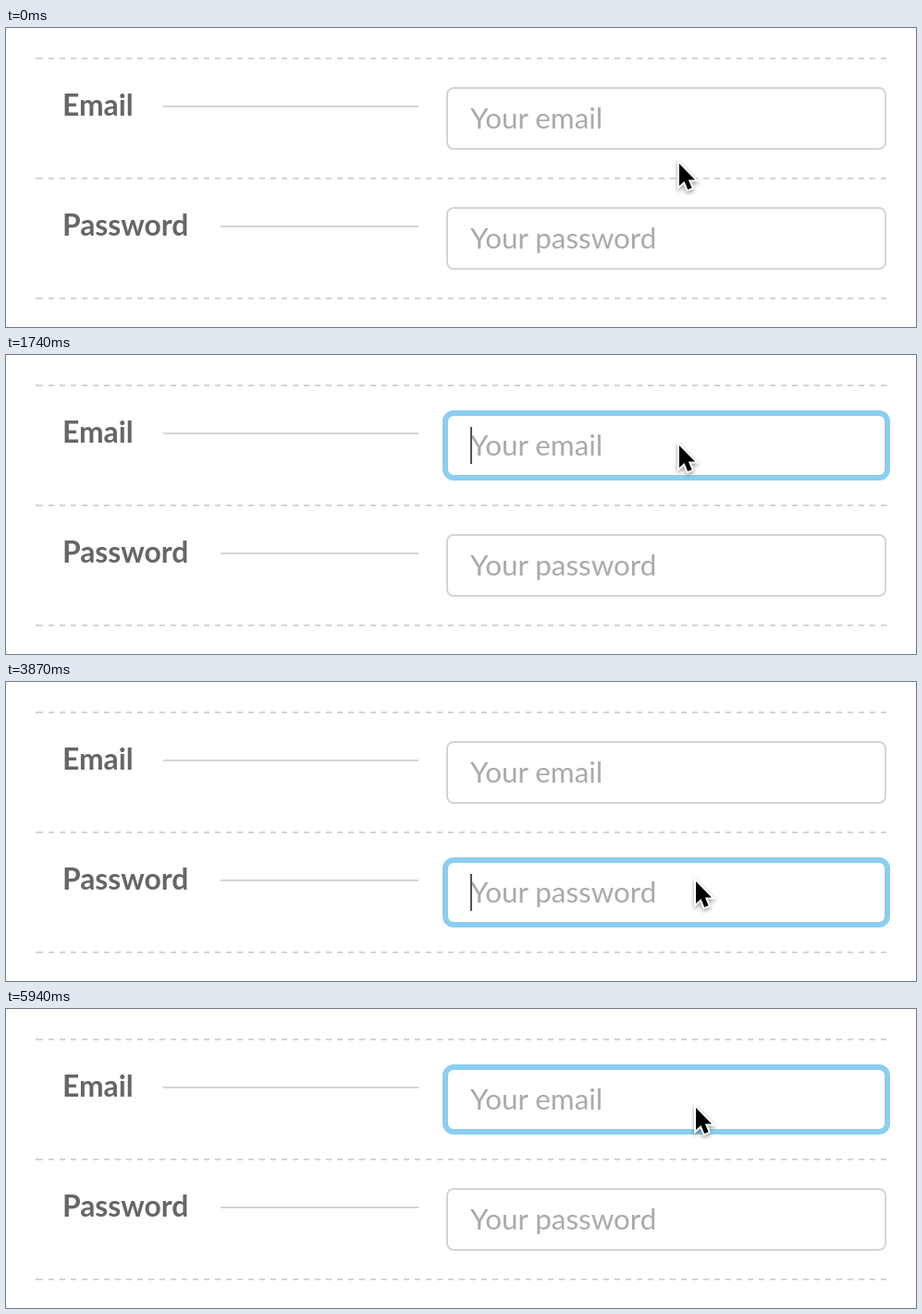
Write an HTML page with a canvas that moves like this. It is 984 px wide and 324 px high and loops after 5.97 s.

```html
<!DOCTYPE html>
<html lang="en">
<head>
<meta charset="utf-8">
<title>Focus ring</title>
<style>
  html, body { margin: 0; width: 100%; height: 100%; overflow: hidden; background: #fff; }
  svg, canvas { position: absolute; left: 0; top: 0; }
  text { font-family: Lato, "Open Sans", sans-serif; }
  .label { font-size: 31.8px; font-weight: 700; fill: #666; }
  .hint { font-size: 31.4px; fill: #aaa; }
  .rule { stroke: #d4d4d4; stroke-width: 2; }
  .dash { stroke-dasharray: 8 6 6 0; stroke-dasharray: 6 6; }
</style>
</head>
<body>
<svg width="984" height="324" viewBox="0 0 984 324">
  <g class="rule">
    <path d="M32 33h2M32 163h2M32 293h2M170 85H446M232 215H446"/>
    <path class="dash" d="M34 33H952M34 163H952M34 293H952"/>
  </g>
  <text class="label" x="61" y="94.5">Email</text>
  <text class="label" x="61" y="224.5">Password</text>
  <text class="hint" x="502" y="108.5">Your email</text>
  <text class="hint" x="502" y="238.5">Your password</text>
</svg>
<canvas id="stage" width="984" height="324"></canvas>
<script>
const ctx = document.getElementById('stage').getContext('2d');
const LOOP = 5970, STEP = 30;
const RING_TIME = 400, RING_START = 23;
const BOX = { x: 476, w: 476, h: 68 };
const FIELDS = [64, 194];

// start time and field index of each focus
const FOCUS = [[900, 0], [3300, 1], [4920, 0]];
// start, end, and where the pointer arrives
const MOVES = [
  [30, 390, 729, 100],
  [2100, 2421, 747, 218],
  [4440, 4800, 747, 109]
];
const HOME = [729, 149];

const ARROW = new Path2D('M0 0V24L5.5 19L9.2 28L13.6 26.2L9.9 17.4H17Z');
const BEAM = new Path2D('M-7 -15C-3 -15 0 -14 0 -10V10C0 14 -3 15 -7 15M7 -15C3 -15 0 -14 0 -10M0 10C0 14 3 15 7 15M-3 1H3');

const clamp = v => Math.min(1, Math.max(0, v));
const smooth = p => p * p * (3 - 2 * p);
const even = v => 2 * Math.round(v / 2);

// cubic-bezier(.25, .1, .25, 1)
function ease(x) {
  if (x <= 0 || x >= 1) return clamp(x);
  const curve = (a, b, s) => 3 * a * s * (1 - s) ** 2 + 3 * b * s * s * (1 - s) + s ** 3;
  let lo = 0, hi = 1;
  for (let i = 0; i < 24; i++) {
    const mid = (lo + hi) / 2;
    if (curve(0.25, 0.25, mid) < x) lo = mid; else hi = mid;
  }
  return curve(0.1, 1, lo);
}

function pointerAt(t) {
  let [x, y] = HOME;
  for (const [from, to, tx, ty] of MOVES) {
    const p = smooth(clamp((t - from) / (to - from)));
    x += (tx - x) * p;
    y += (ty - y) * p;
  }
  return [Math.round(x), Math.round(y)];
}

function outline(x, y, w, h, r, line, color) {
  ctx.lineWidth = line;
  ctx.strokeStyle = color;
  ctx.beginPath();
  ctx.roundRect(x + line / 2, y + line / 2, w - line, h - line, r - line / 2);
  ctx.stroke();
}

function drawRing(top, age) {
  const k = ease(age / RING_TIME);
  const gap = RING_START * (1 - k);
  const left = 4 + even(gap + Math.min(gap, 1.3));
  const right = 4 + even(Math.max(0, gap - 0.7));
  const edge = 4 + even(gap);
  outline(BOX.x - left, top - edge, BOX.w + left + right, BOX.h + 2 * edge,
    12, 6, `rgba(140, 206, 240, ${k})`);
}

function drawCaret(top, age) {
  const off = age - 990;
  if (off >= 0 && off % 1180 < 590) return;
  ctx.fillStyle = '#555';
  ctx.fillRect(502, top + 14, 2, 40);
}

function drawArrow(x, y) {
  ctx.save();
  ctx.translate(x - 1, y - 2);
  ctx.lineJoin = 'miter';
  ctx.shadowColor = 'rgba(0, 0, 0, .4)';
  ctx.shadowBlur = 4;
  ctx.shadowOffsetY = 2;
  ctx.strokeStyle = '#fff';
  ctx.lineWidth = 4;
  ctx.stroke(ARROW);
  ctx.shadowColor = 'transparent';
  ctx.fillStyle = '#000';
  ctx.fill(ARROW);
  ctx.restore();
}

function drawBeam(x, y) {
  ctx.save();
  ctx.translate(x, y);
  ctx.strokeStyle = 'rgba(255, 255, 255, .8)';
  ctx.lineWidth = 4;
  ctx.stroke(BEAM);
  ctx.strokeStyle = '#000';
  ctx.lineWidth = 2;
  ctx.stroke(BEAM);
  ctx.restore();
}

function draw(t) {
  ctx.clearRect(0, 0, 984, 324);
  const [start, active] = FOCUS.filter(f => f[0] <= t).pop() || [0, -1];
  const [x, y] = pointerAt(t);
  let beam = false;
  FIELDS.forEach((top, i) => {
    if (i === active) {
      drawRing(top, t - start);
      drawCaret(top, t - start);
    } else {
      outline(BOX.x, top, BOX.w, BOX.h, 8, 2, '#d4d4d4');
      if (y >= top && y < top + BOX.h) beam = true;
    }
  });
  (beam ? drawBeam : drawArrow)(x, y);
}

const begin = performance.now();
function tick() {
  const t = (performance.now() - begin) % LOOP;
  draw(Math.floor(t / STEP) * STEP);
  requestAnimationFrame(tick);
}
tick();
</script>
</body>
</html>
```
